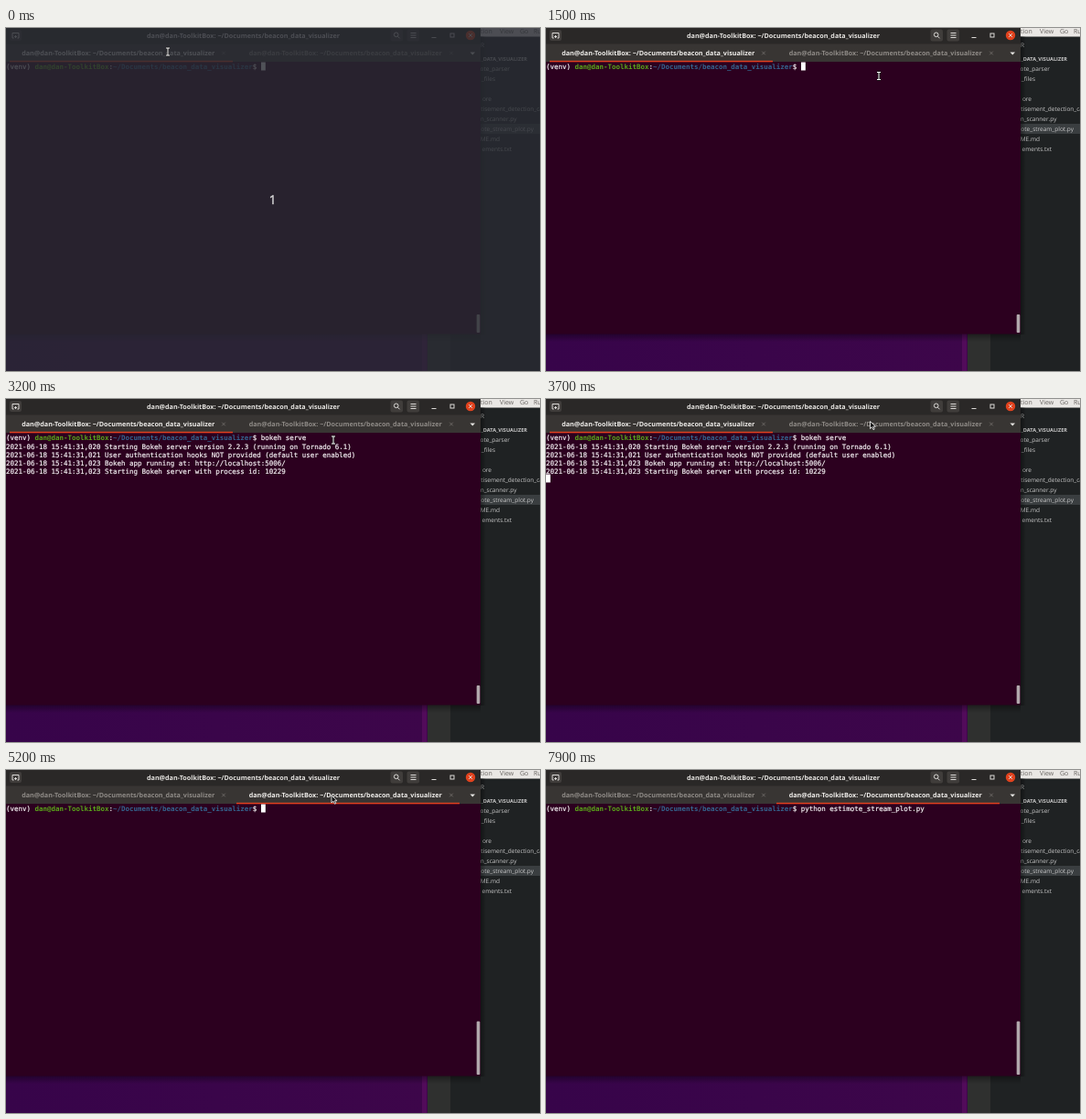
Animation, 584 px wide and 376 px high, one loop 8000 ms. Source, as an HTML page:

```html
<!DOCTYPE html>
<html>
<head>
<meta charset="utf-8">
<style>
  html, body { margin: 0; width: 100%; height: 100%; overflow: hidden; background: #1f2223; }
  svg { display: block; }
  text { white-space: pre; text-rendering: geometricPrecision; }
  .ui text { font: 6.5px "Open Sans", sans-serif; fill: #c8c8c8; }
  .name { font: bold 7.2px "Open Sans", sans-serif; }
  .term text { font: 7.475px "DejaVu Sans Mono", monospace; fill: #f4f1f3; stroke: #f4f1f3; stroke-width: .2; }
  .term .b { font-weight: bold; stroke: none; }
  .line { fill: none; stroke: #dcdad7; stroke-width: 1; }
</style>
</head>
<body>
<svg width="584" height="376" viewBox="0 0 584 376">
  <defs>
    <linearGradient id="wall"><stop stop-color="#37044a"/><stop offset="1" stop-color="#3d064a"/></linearGradient>
    <linearGradient id="shadeY" x2="0" y2="1"><stop stop-opacity=".4"/><stop offset="1" stop-opacity="0"/></linearGradient>
    <linearGradient id="shadeX"><stop stop-opacity=".4"/><stop offset="1" stop-opacity="0"/></linearGradient>
  </defs>

  <!-- desktop and editor behind the terminal -->
  <g class="ui">
    <rect width="584" height="376" fill="#1f2223"/>
    <rect y="330" width="461" height="46" fill="url(#wall)"/>
    <rect x="455" y="330" width="5" height="46" fill="#520b5a"/>
    <rect x="461" y="330" width="25" height="46" fill="#2f302f"/>
    <rect x="510" width="74" height="9.5" fill="#e9e7e4"/>
    <rect x="510" y="105" width="74" height="11" fill="#3a3e40"/>
    <g id="menu"></g>
    <g id="files"></g>
    <rect x="519" y="9" width="6" height="327" fill="url(#shadeX)"/>
    <rect y="335" width="519" height="9" fill="url(#shadeY)"/>
  </g>

  <!-- terminal window -->
  <rect width="519" height="335.5" fill="#2c001f"/>
  <rect width="519" height="18" fill="#2a2827"/>
  <rect y="17.5" width="519" height="19.5" fill="#383533"/>
  <g fill="#403d3b">
    <rect x="4" y="2" width="13" height="12" rx="2"/>
    <rect x="420.500" y="1.500" width="13.500" height="13" rx="2"/>
    <rect x="438.500" y="1.500" width="13.500" height="13" rx="2"/>
  </g>
  <g class="line">
    <path d="M8.500 11H7V5.500H14V11H12.500M10.500 11V8M9 9.500H12"/>
    <circle cx="426.700" cy="7.300" r="2.300"/>
    <path d="M428.500 9.200L430.500 11.300M442.500 5.500H448.500M442.500 8H448.500M442.500 10.500H448.500M465.500 10.500H470.500"/>
    <rect x="486" y="6" width="4" height="4"/>
  </g>
  <circle cx="508" cy="8" r="5.200" fill="#e2431e"/>
  <path class="line" d="M506.200 6.200L509.800 9.800M509.800 6.200L506.200 9.800"/>
  <path d="M507.500 26.500H513L510.250 29.500Z" fill="#e6e4e2"/>
  <path d="M236.200 25.700L239.800 29.300M239.800 25.700L236.200 29.300M485.200 25.700L488.800 29.300M488.800 25.700L485.200 29.300" stroke="#77736f" stroke-width=".8"/>
  <g text-anchor="middle">
    <text class="name" x="259.500" y="10.500" fill="#e8e6e3"></text>
    <text class="name" id="tab1" x="122.700" y="30"></text>
    <text class="name" id="tab2" x="371.200" y="30"></text>
  </g>
  <rect id="underline" y="35.800" width="244" height="1.500" fill="#e0401f"/>
  <rect id="slider" x="514.700" width="3.600" rx="1" fill="#b1a8ac"/>

  <g class="term">
    <text y="45"><tspan>(venv) </tspan><tspan id="user" class="b" fill="#5aa61a"></tspan>:<tspan id="path" class="b" fill="#34658f"></tspan>$ <tspan id="command"></tspan></text>
    <g id="output"></g>
    <rect id="block" width="4.800" height="9" fill="#fff"/>
  </g>

  <g id="tip">
    <rect x="266" y="38" width="211.500" height="21.500" rx="3" fill="#080507" fill-opacity=".93"/>
    <text class="name" x="371" y="51" text-anchor="middle" fill="#f6f6f6" stroke="#f6f6f6" stroke-width=".15" style="font-weight:400"></text>
  </g>

  <g id="veil">
    <rect width="584" height="376" fill="#282a32" fill-opacity=".81"/>
    <text x="291.500" y="193" text-anchor="middle" fill="#dedede" stroke="#dedede" stroke-width=".3" style="font:13.500px 'Noto Sans',sans-serif">1</text>
  </g>

  <g id="pointer" fill="none" stroke="#fff">
    <g id="beam">
      <path d="M-2 -4H2M0 -4V4M-2 4H2" stroke="#111" stroke-width="2.400"/>
      <path d="M-2 -4H2M0 -4V4M-2 4H2"/>
    </g>
    <path id="arrow" d="M0 0V8L2 6.200L3.500 9.200L4.800 8.500L3.400 5.700H6Z" fill="#111" stroke-width=".8"/>
    <path id="slant" d="M1 -3V-2M1 -.5L.3 2L-1 3" stroke-width=".9"/>
    <path id="hook" d="M-.5 5V0Q0 -2.300 4 -2" stroke-width=".9"/>
  </g>
</svg>
<script>
const $ = id => document.getElementById(id);
const user = 'dan@dan-ToolkitBox', path = '~/Documents/beacon_data_visualizer';
const CHAR = 4.5, ROW = 9, TOP = 37.5;

function addText(parent, x, y, string, style = '') {
  const el = document.createElementNS('http://www.w3.org/2000/svg', 'text');
  el.setAttribute('x', x);
  el.setAttribute('y', y);
  el.style.cssText = style;
  el.textContent = string;
  $(parent).append(el);
}

document.querySelectorAll('.name').forEach(el => el.textContent = `${user}: ${path}`);
$('user').textContent = user;
$('path').textContent = path;

[[519, 'tion'], [540, 'View'], [562, 'Go'], [577, 'Run']]
  .forEach(([x, s]) => addText('menu', x, 6.3, s, 'fill:#66625f;font-size:7px'));
[[523, 18, 'R'], [570, 33, '_DATA_VISUALIZER', 'font-weight:bold;font-size:5.6px'], [551, 44, 'ote_parser'],
 [535, 55, '_files'], [531, 77, 'ore'], [587, 88, 'tisement_detection_ca'], [558.5, 99, 'n_scanner.py'],
 [577, 110, 'ote_stream_plot.py'], [540, 121, 'ME.md'], [553, 132, 'ements.txt']]
  .forEach(([x, y, s, style = '']) => addText('files', x, y + 2.5, s, 'text-anchor:end;' + style));
['020 Starting Bokeh server version 2.2.3 (running on Tornado 6.1)',
 '021 User authentication hooks NOT provided (default user enabled)',
 '023 Bokeh app running at: http://localhost:5006/',
 '023 Starting Bokeh server with process id: 10229']
  .forEach((s, i) => addText('output', 0, 45.5 + ROW * (i + 1), '2021-06-18 15:41:31,' + s));

// Each list holds [time, ...state]; a state lasts until the next entry.
const commands = [[0, ''], [1600, 'bokeh serve'], [5000, ''], [6200, 'python estimote_stream_plot.py']];
const blocks = [[0, 62, 0], [1000], [1500, 62, 0], [1600, 73, 0], [2100], [2600, 73, 0], [2800, 0, 1],
  [3100, 0, 5], [3200], [3700, 0, 5], [4200], [4800, 0, 5], [5000, 62, 0], [5600], [6100, 62, 0],
  [6200, 92, 0], [6700], [7300, 92, 0], [7500, 0, 1], [7900]];
const pointers = [[0, 'beam', 177, 26], [400, 'beam', 364, 52.5], [1600, 'slant', 358, 52],
  [3200, 'beam', 358, 45], [3300, 'arrow', 359, 31], [3400, 'arrow', 358, 20], [3500, 'arrow', 356, 18],
  [3700, 'arrow', 354.5, 24.5], [5200, 'arrow', 356, 28], [5300, 'beam', 361, 52], [5400, 'hook', 364, 82], [6200]];
const at = (list, t) => list.findLast(entry => entry[0] <= t).slice(1);
const show = (id, on) => $(id).style.display = on ? '' : 'none';

function draw(t) {
  const second = t >= 5000;
  show('veil', t < 400);
  show('tip', t >= 4200 && t < 5000);
  show('output', t >= 3100 && t < 5000);
  $('tab1').setAttribute('fill', second ? '#8f8b87' : '#f0eeeb');
  $('tab2').setAttribute('fill', second ? '#f0eeeb' : '#8f8b87');
  $('underline').setAttribute('x', second ? 252 : 4);
  $('slider').setAttribute('y', second ? 275.5 : 314);
  $('slider').setAttribute('height', second ? 58.5 : 20);
  $('command').textContent = at(commands, t)[0];

  const [col, row] = at(blocks, t);
  show('block', col !== undefined);
  if (col !== undefined) {
    $('block').setAttribute('x', col * CHAR);
    $('block').setAttribute('y', TOP + row * ROW);
  }

  const [kind, x = 0, y = 0] = at(pointers, t);
  ['beam', 'arrow', 'slant', 'hook'].forEach(id => show(id, id === kind));
  $('pointer').setAttribute('transform', `translate(${x} ${y})`);
}

const start = performance.now();
function tick() {
  draw((performance.now() - start) % 8000);
  requestAnimationFrame(tick);
}
tick();
</script>
</body>
</html>
```
